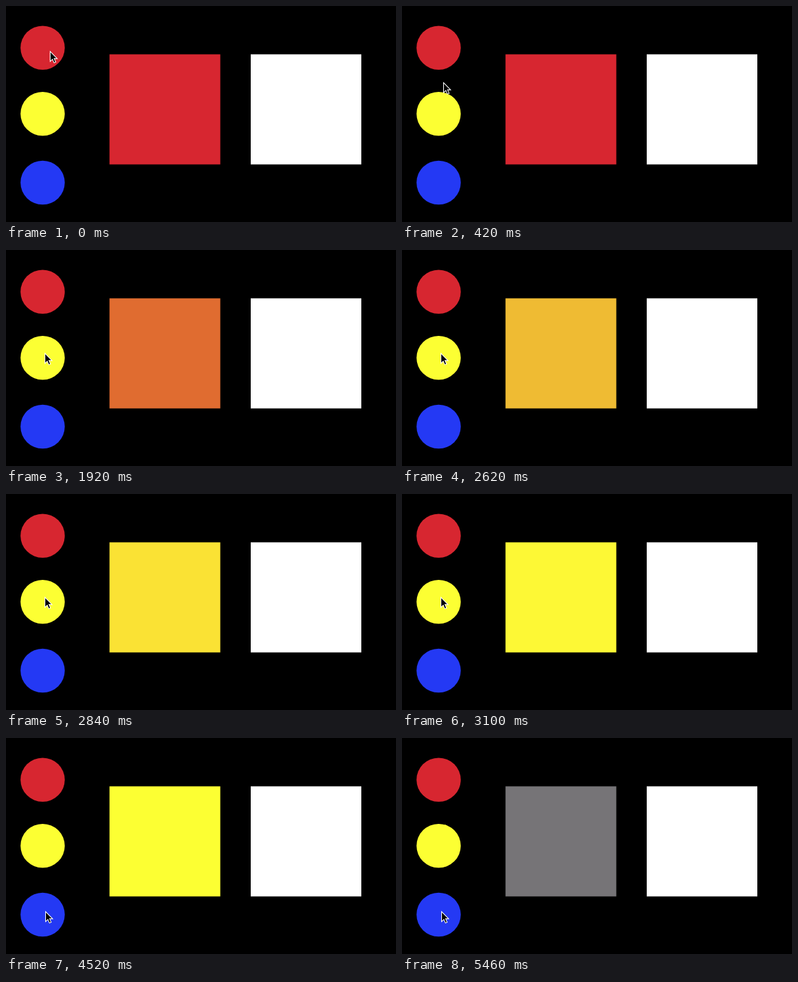
Write an HTML page that moves like this. It is 596 by 332 pixels and loops after 6500 ms.

```html
<!DOCTYPE html>
<html lang="en">
<head>
<meta charset="utf-8">
<title>Colour mixing</title>
<style>
  html, body { margin: 0; width: 100%; height: 100%; overflow: hidden; background: #000; }
  svg { display: block; }
</style>
</head>
<body>
<svg width="596" height="332" viewBox="0 0 596 332">
  <circle cx="56" cy="64.2" r="33.8" fill="#d72630"/>
  <circle cx="56" cy="165.7" r="33.8" fill="#fcff33"/>
  <circle cx="56" cy="271.5" r="33.8" fill="#2439f4"/>
  <rect id="mix" x="158.2" y="74.3" width="169.3" height="169.2"/>
  <rect x="374" y="74.3" width="169" height="169.2" fill="#fff"/>
  <path id="cursor" d="M.5 .8V16.2L4 12.9L6.4 18.4L9 17.3L6.7 11.9H11.3Z"
        fill="#000" stroke="#fff" stroke-width="1.1"/>
</svg>
<script>
const LOOP = 6500;
const mix = document.getElementById('mix');
const cursor = document.getElementById('cursor');

// Mixed colour from each moment on
const mixes = [
  [0, '#d72630'], [1000, '#e06c30'], [2620, '#efbb33'], [2840, '#fae234'],
  [3080, '#fdf835'], [3960, '#fcff33'], [4760, '#767477']
];

const progress = (t, from, to) => Math.min(1, Math.max(0, (t - from) / (to - from)));
const smooth = u => u * u * (3 - 2 * u);

function pointer(t) {
  if (t < 3960) {
    const e = smooth(progress(t, 20, 600) ** 1.75);
    return [67 - 8 * e, 69 + 89 * e];
  }
  const u = progress(t, 3960, 4520);
  const bow = 9.7 * Math.sin(Math.PI * u ** 0.45);
  return [59 + u + bow, 158 + 108 * (1 - (1 - u) ** 4)];
}

function draw() {
  const t = performance.now() % LOOP;
  const [x, y] = pointer(t).map(Math.round);
  cursor.setAttribute('transform', `translate(${x} ${y})`);
  mix.setAttribute('fill', mixes.filter(([start]) => start <= t).pop()[1]);
  requestAnimationFrame(draw);
}
draw();
</script>
</body>
</html>
```
